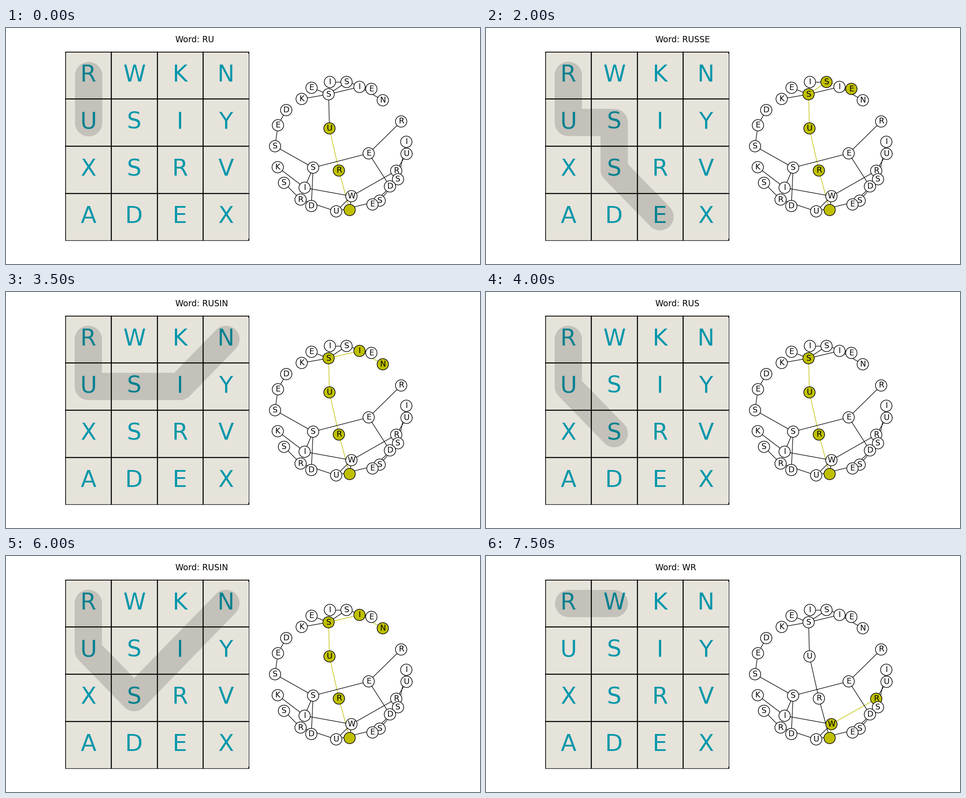
These frames come from a looping animation (1058x529 px, 8000 ms). A matplotlib script:

```python
import matplotlib.pyplot as plt
from matplotlib.animation import FuncAnimation
from matplotlib.collections import LineCollection

W, H, DPI = 1058, 529, 100
PT = 72 / DPI  # points per pixel

LETTERS = "RWKNUSIYXSRVADEX"
XS = [133, 235, 338, 440, 542]
YS = [54, 159, 265, 371, 476]
BEIGE, TEAL = "#e6e3da", "#0797aa"
YELLOW, GREEN = (0.75, 0.75, 0), (0, 0.5, 0)
WORDS = {"RUSK", "RUSE"}

# Prefix tree: each prefix and its place on the stage
NODES = {
    "": (767, 408),
    "R": (743, 319.5), "RU": (722, 225), "RUS": (720, 148.5),
    "RUSS": (760, 121), "RUSSI": (723, 121), "RUSSE": (815.5, 136.5),
    "RUSK": (660, 159), "RUSI": (789, 132), "RUSIN": (841, 162),
    "RUSE": (682, 134),
    "W": (771, 377), "WR": (871, 320), "WRU": (894, 282),
    "WU": (737, 411), "WUR": (657.5, 384.5), "WURS": (620.5, 347),
    "WUS": (834, 387), "WUSS": (875, 339), "WUSSI": (893.5, 255),
    "WUSSE": (818, 395.5),
    "WI": (666.5, 358), "WIS": (685.5, 313), "WISS": (600.5, 265),
    "WISSE": (607, 218), "WISSED": (625.5, 184), "WISD": (681.5, 399),
    "WISE": (809.5, 281), "WISER": (882, 209.5), "WISED": (857, 355),
    "WIK": (606.5, 312),
}
EDGES = [p for p in NODES if p]

# Cells visited by each step of the depth-first search
STEPS = [
    (0, 4), (0, 4, 5), (0, 4, 5, 9), (0, 4, 5, 9, 6), (0, 4, 5, 9, 14),
    (0, 4, 5, 2), (0, 4, 5, 6), (0, 4, 5, 6, 3),
    (0, 4, 9), (0, 4, 9, 5), (0, 4, 9, 5, 6),
    (0, 4, 9, 6), (0, 4, 9, 6, 3), (0, 4, 9, 14),
    (1,), (1, 0),
]


def center(cell):
    row, col = divmod(cell, 4)
    return 183.7 + 102.4 * col, 106 + 105.7 * row


def line(x, y, width, **kw):
    return ax.plot(x, y, color="black", lw=width * PT, **kw)[0]


plt.rcParams["font.family"] = "DejaVu Sans"
fig = plt.figure(figsize=(W / DPI, H / DPI), dpi=DPI, facecolor="white")
ax = fig.add_axes([0, 0, 1, 1])
ax.set_xlim(0, W)
ax.set_ylim(H, 0)
ax.axis("off")

# Letter board
ax.add_patch(plt.Rectangle((XS[0], YS[0]), XS[-1] - XS[0], YS[-1] - YS[0],
                           fc=BEIGE, ec="none"))
for i in range(5):
    inner = 0 < i < 4
    line([XS[i]] * 2, [YS[0], YS[-1]], 2.3 if inner else 1.6 if i == 0 else 1.1)
    line([XS[0], XS[-1]], [YS[i]] * 2, 2.3 if inner else 1.8 if i == 0 else 1.2)
for y in (YS[0], YS[-1] - 3):
    line([XS[-1]] * 2, [y, y + 3], 2)
for cell, letter in enumerate(LETTERS):
    x, y = center(cell)
    ax.text(x, y, letter, size=51 * PT, color=TEAL, ha="center", va="center")
trail = line([], [], 61, alpha=0.15, zorder=5,
             solid_capstyle="round", solid_joinstyle="round")

# Tree
links = LineCollection([(NODES[p[:-1]], NODES[p]) for p in EDGES],
                       linewidths=1.3 * PT, zorder=6)
ax.add_collection(links)
dots = ax.scatter(*zip(*NODES.values()), s=(25.4 * PT) ** 2, linewidths=1.4 * PT,
                  edgecolors="black", facecolors="white", zorder=7)
for prefix, (x, y) in NODES.items():
    ax.text(x, y, prefix[-1:], size=17.6 * PT, ha="center", va="center", zorder=8)

title = ax.text(377.5, 31.5, "", size=18.6 * PT, va="baseline")


def draw(i):
    path = STEPS[i]
    word = "".join(LETTERS[c] for c in path)
    tint = GREEN if word in WORDS else YELLOW
    points = [center(c) for c in path]
    if len(points) == 1:
        points *= 2
    trail.set_data(*zip(*points))
    title.set_text("Word: " + word)
    links.set_color([tint if word.startswith(p) else "black" for p in EDGES])
    dots.set_facecolors([tint if word.startswith(p) else "white" for p in NODES])
    return trail, title, links, dots


anim = FuncAnimation(fig, draw, frames=len(STEPS), interval=500,
                     repeat=True, repeat_delay=0, blit=False)
plt.show()
```
